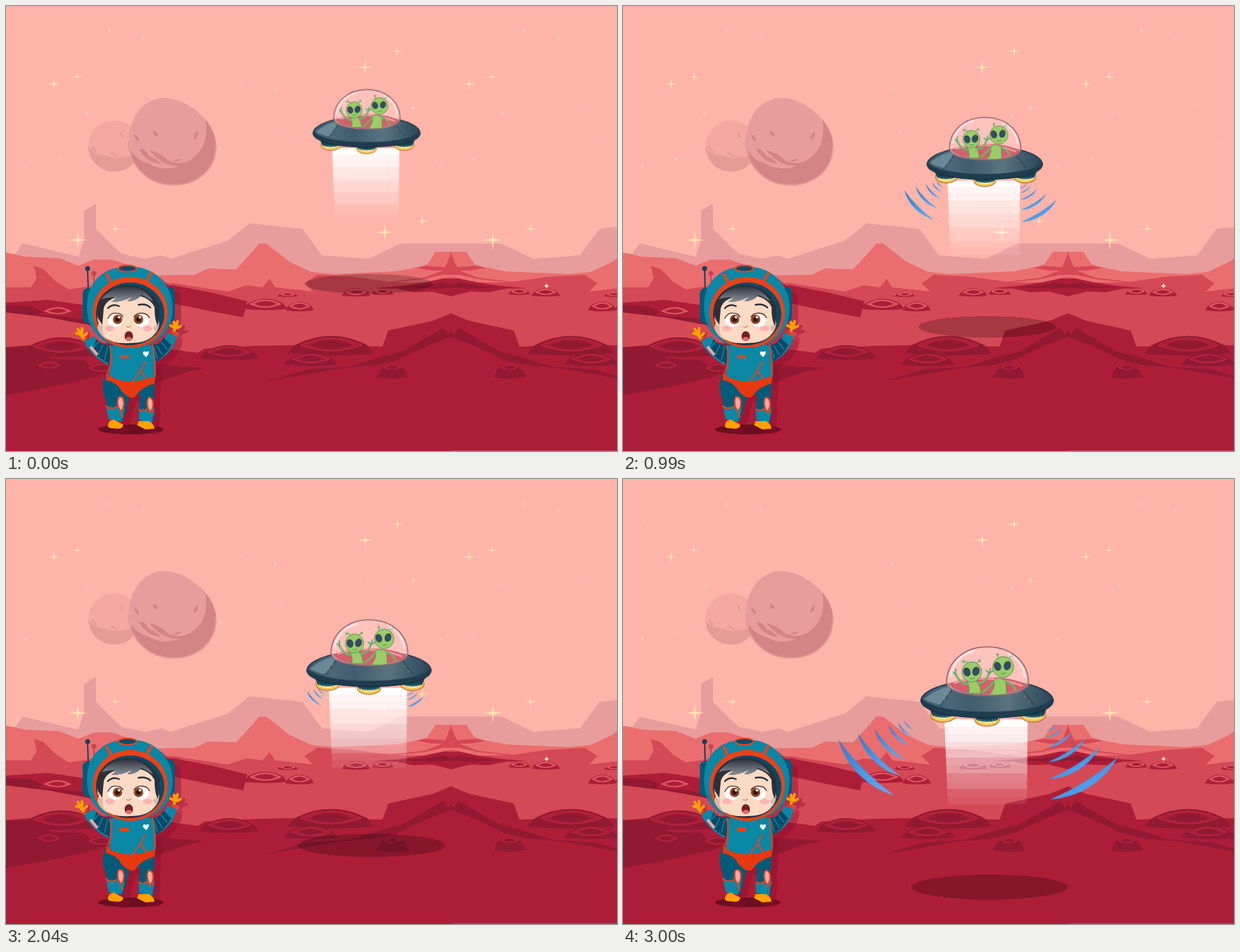
Animation of 876 by 639 pixels, one loop 3030 ms. Source, as an HTML page:

```html
<!DOCTYPE html>
<html lang="en">
<head>
<meta charset="utf-8">
<title>Visitors on the red planet</title>
<style>
  html, body { margin: 0; width: 100%; height: 100%; overflow: hidden; background: #ffb4a9; }
  svg { display: block; width: 876px; height: 639px; }
  #ufo { animation: descend 3030ms steps(101) infinite; }
  #shade { animation: shade 3030ms steps(101) infinite; }
  .wave { animation: spread 1515ms infinite; }
  .wave path { fill: url(#blue); }
  @keyframes descend {
    from { transform: translate(517px, 120px) scale(.81); }
    to { transform: translate(522.05px, 242.2px) scale(1.002); }
  }
  @keyframes shade {
    from { transform: translate(520.4px, 399px) scale(91.5, 14.2); }
    to { transform: translate(525.6px, 587.9px) scale(112.7, 18); }
  }
  @keyframes spread {
    0% { transform: translate(0, 0) scale(.78); animation-timing-function: linear; }
    91.8% { transform: translate(0, 0) scale(1); animation-timing-function: ease-in; }
    98%, 100% { transform: translate(var(--dx), 0) scale(1.17); }
  }
</style>
</head>
<body>
<svg viewBox="0 0 876 639" xmlns="http://www.w3.org/2000/svg">
  <defs>
    <linearGradient id="blue" x1="0" y1="0" x2="1" y2="1">
      <stop offset="0" stop-color="#2f78c4"/><stop offset=".5" stop-color="#4599ea"/><stop offset="1" stop-color="#69aeea"/>
    </linearGradient>
    <linearGradient id="hull" x1="0" y1="0" x2="1" y2="0">
      <stop offset="0" stop-color="#3b5d70"/><stop offset=".2" stop-color="#4a6878"/>
      <stop offset=".38" stop-color="#405e6e"/><stop offset=".66" stop-color="#5a747f"/><stop offset="1" stop-color="#29485a"/>
    </linearGradient>
    <linearGradient id="hair" x1="0" y1="0" x2="0" y2="1">
      <stop offset="0" stop-color="#30343d"/><stop offset="1" stop-color="#8b939b"/>
    </linearGradient>
    <clipPath id="moonClip"><use href="#moonShape"/></clipPath>
    <clipPath id="small"><circle cx="155" cy="201" r="37"/></clipPath>
  </defs>

  <rect width="876" height="639" fill="#ffb4a9"/>
  <g id="far" fill="#e89d9c">
    <path d="M0 357L14 355 24 341 104 360 112 334V294L129 284V320L154 345 166 356 200 363 223 358 236 363 318 337 349 312 425 320 453 358 520 363 566 341H639V400H0Z"/>
  </g>
  <use href="#far" transform="matrix(-1 0 0 1 1276 0)"/>
  <g id="stars" fill="#ffe5b0"></g>

  <g clip-path="url(#small)">
    <circle cx="155" cy="201" r="37" fill="#f4a8a0"/>
    <path d="M116 200Q126 215 144 215 160 222 192 212V240H116Z" fill="#e79b95"/>
    <path d="M123 202l6 8M165 181l2 8M150 211l10 5" stroke="#e79b95" stroke-width="3"/>
  </g>
  <path id="moonShape" d="M228 132C260 133 301 166 301 200 301 236 274 257 240 257 202 257 176 228 176 194 176 160 197 132 228 132Z" fill="#e89d9c"/>
  <g clip-path="url(#moonClip)" fill="#d58485">
    <path d="M286 164Q291 195 274 213 256 232 233 222 221 210 205 207L216 218Q230 230 248 230 222 238 204 226 186 221 180 208L184 262H306V164Z"/>
    <path d="M211 179q8 3 6 8-8-1-6-8M184 184q7 4 7 11-8-4-7-11M269 193q0-10 6-13 1 9-6 13M239 223q6-4 13-3-5 4-13 3M191 205q9-1 14 10 11 4 17 12-22-3-31-22"/>
    <use href="#moonShape" style="opacity:0"/>
  </g>
  <path d="M301 200C301 236 274 257 240 257 202 257 176 228 176 194" fill="none" stroke="#e49995" stroke-width="2"/>

  <g id="land">
    <path fill="#eb6e6f" d="M0 354L28 360 76 362 104 373 126 364 152 364 176 372 202 387 270 386 290 377 330 378 354 352 363 341H373L406 367 438 382 470 385 560 381 590 375 604 371 616 353H639V430H0Z"/>
    <path fill="#d54855" d="M639 352L632 370 626 380 600 390 550 396 500 389 446 386 428 398 440 410 386 404 378 392 368 404 345 401 318 410 240 398 150 398 90 407 72 396 54 378 40 373 44 391 36 404 0 404V640H639Z"/>
    <path fill="#d54855" d="M588 376L603 373 639 376V380L611 380Z"/>
    <path fill="#eb6e6f" d="M556 397L600 392 626 386 639 386V389L600 397Z"/>
    <path fill="#ad1d38" d="M0 426L60 422 130 432 130 404 240 401 292 411 346 424 340 447 292 438 240 427 130 455 60 443 0 437Z"/>
    <path fill="#921932" d="M0 430L36 431 60 443 130 452V460L60 447 0 440Z"/>
    <path fill="#ad1d38" d="M530 405L566 402 600 397 628 391 639 392V417L610 410 584 411 560 406Z"/>
    <path fill="#921932" d="M566 404L600 401 626 397 639 401V404L612 406Z"/>
    <path fill="#ad1d38" d="M0 490L45 486 110 482 200 488 275 498 284 492 360 488 414 487 540 489 548 466 612 452 639 441V640H0Z"/>
    <path fill="#921932" d="M374 539L430 522 492 518 540 503 566 497 600 478 627 462 634 472 639 464V475L604 488 560 509 528 516 476 521Z"/>
    <path fill="#921932" d="M0 490L30 489 66 507 112 508 136 531 80 544 0 559ZM210 514L286 520 260 525 205 545Z"/>
    <g id="craters"></g>
  </g>
  <use href="#land" transform="matrix(-1 0 0 1 1276 0)"/>
  <path d="M638 638.8H876" stroke="#e4a9b2" stroke-width=".4"/>
  <path d="M775 397q0 5 5 5-5 0-5 5 0-5-5-5 5 0 5-5" fill="#ffe5b0"/>

  <circle id="shade" r="1" fill-opacity=".22"/>

  <ellipse cx="179" cy="608" rx="47" ry="7" fill="#6d0d22"/>
  <g id="boy" style="filter:drop-shadow(9px 7px 0 rgba(140,15,45,.42))">
    <path d="M118 410L117 378" stroke="#17405a" stroke-width="2"/>
    <circle cx="117" cy="377" r="3.6" fill="#17405a"/>
    <g id="arms">
      <path d="M151 487Q140 492 126 474L112 481Q118 499 146 516Z" fill="#0a87a4"/>
      <path d="M151 486Q137 489 130 478L124 493Q134 509 148 513Z" fill="#074a68"/>
      <path d="M207 486Q225 489 231 469L244 474Q241 498 212 513Z" fill="#0a87a4"/>
      <path d="M207 486Q220 488 226 476L237 487Q229 503 212 513Z" fill="#074a68"/>
      <path d="M133 482l-8 9M139 486l-7 15M146 488l-5 20M222 482l9 11M216 487l8 14M212 490l5 17" stroke="#0a87a4" stroke-width="1.5"/>
      <path d="M121 489l10 12" stroke="#f3a5a0" stroke-width="4"/>
      <path d="M110 482L116 474M236 468L244 472" stroke="#e8421a" stroke-width="3"/>
      <path d="M111 477L106 471M106 471L101 470M107 470L103 464M109 470L109 463M111 474L116 470M241 466L243 461M242 462L236 459M242 460L241 454M244 460L246 453M245 462L250 460" stroke="#ffa000" stroke-width="4" stroke-linecap="round"/>
    </g>
    <path d="M142 530Q135 547 143 566L147 590 168 596 178 558 192 558 190 595 211 598 212 560 214 530Z" fill="#005b78"/>
    <path d="M143 573Q153 581 167 570L170 580 165 597 147 593ZM190 578Q200 584 211 572L213 580 209 599 191 594Z" fill="#0a87a4"/>
    <path d="M143 574Q151 582 162 573M190 579Q198 584 206 575M164 582L168 591M205 585L212 580" stroke="#e8421a" stroke-width="2" fill="none"/>
    <path d="M161 562q7-3 8 7 0 11-5 12-6-8-3-19M204 562q7 0 7 10-1 9-5 10-6-10-2-20" fill="#f7aaa5" stroke="#e8421a" stroke-width="2"/>
    <path d="M146 604Q147 593 155 594L168 601Q168 607 160 607L149 606ZM190 596L205 596Q213 601 213 607L200 608 188 602Z" fill="#ffa000"/>
    <path d="M148 488Q178 482 210 487 217 509 214 536L182 553 147 532Q152 509 148 488Z" fill="#0a87a4"/>
    <path d="M144 524L151 533Q179 546 214 531L213 542Q194 547 184 562 174 564 165 552 159 540 143 537Z" fill="#e8380f"/>
    <path d="M149 487Q153 504 147 526M210 486Q214 507 214 531M180 542L193 523 200 510M193 523L201 536" fill="none" stroke="#e8421a" stroke-width="2"/>
    <rect x="164" y="501" width="12" height="5" fill="#e8421a"/>
    <path d="M201 504C193 499 197 494 201 497 206 493 206 500 201 504Z" fill="#fff"/>
    <rect x="110" y="405" width="18" height="51" rx="8" fill="#005b78"/>
    <rect x="226" y="403" width="16" height="51" rx="8" fill="#005b78"/>
    <path d="M116 432C116 393 142 374 177 374 213 374 238 399 239 433 239 471 211 490 177 490 143 490 116 470 116 432Z" fill="#0a87a4"/>
    <path d="M144 384L152 400M209 382L200 399" stroke="#e8421a" stroke-width="4"/>
    <ellipse cx="174" cy="377" rx="13" ry="4.5" fill="#074a68" stroke="#e8421a" stroke-width="2"/>
    <ellipse cx="178" cy="440" rx="54" ry="51" fill="#e8421a"/>
    <ellipse cx="178" cy="442" rx="49" ry="45" fill="#074a68"/>
    <ellipse cx="175" cy="444" rx="45" ry="43" fill="#2b3039"/>
    <path d="M133 456Q128 465 139 474 153 486 178 484 203 484 213 471 222 462 218 449L213 431Q202 414 175 415 145 416 138 432Z" fill="#fcdac4"/>
    <path d="M140 440Q131 438 131 451 133 460 139 459Q136 475 149 480 136 477 131 462ZM212 438L218 455 211 462 215 470 220 456Z" fill="#dfb7a2"/>
    <path d="M131 430Q139 403 170 401 204 398 220 431 219 450 218 459 213 453 213 432 206 419 194 415 187 424 174 424 178 420 181 417 165 426 151 425 155 422 159 418 142 423 140 435L138 458 132 448Z" fill="#2b3039"/>
    <path d="M137 421Q151 402 174 403 198 403 211 424 202 418 194 415 187 424 174 424L181 417Q165 426 151 425L159 418Q145 418 137 421Z" fill="url(#hair)"/>
    <path d="M146 434Q153 427 162 431M190 429Q201 427 207 433" stroke="#2b3039" stroke-width="2.4" fill="none" stroke-linecap="round"/>
    <g fill="#fff"><ellipse cx="157" cy="451" rx="11" ry="10"/><ellipse cx="194" cy="451" rx="11" ry="10"/></g>
    <g fill="#8c4422"><circle cx="160" cy="450" r="6.8"/><circle cx="190" cy="450" r="6.8"/></g>
    <g fill="#35150f"><circle cx="160" cy="450" r="3.5"/><circle cx="190" cy="450" r="3.5"/></g>
    <g fill="#fff"><circle cx="162" cy="447" r="1.8"/><circle cx="192" cy="447" r="1.8"/></g>
    <path d="M146 449Q150 440 158 441 165 441 168 447M183 447Q187 441 194 441 203 441 206 448" fill="none" stroke="#59322b" stroke-width="1.3"/>
    <g fill="#ffb4b3"><ellipse cx="149" cy="463" rx="7" ry="4"/><ellipse cx="203" cy="463" rx="7" ry="4"/></g>
    <path d="M172 460q4 3 7-1" stroke="#d99874" stroke-width="1.5" fill="none"/>
    <ellipse cx="176" cy="474" rx="6" ry="7" fill="#791e23"/>
    <ellipse cx="176" cy="478" rx="4" ry="2.7" fill="#e86b6e"/>
  </g>

  <g id="ufo"><g transform="translate(-522 -241)">
    <g id="beam" fill="#fff"></g>
    <g transform="translate(458 341)"><g class="wave" data-angle="135" style="--dx:-36px"></g></g>
    <g transform="translate(578 342)"><g class="wave" data-angle="58" style="--dx:28px"></g></g>
    <g id="lamps"></g>
    <path d="M427 319C427 305 458 293 486 291H560C591 294 617 306 617 319 614 335 572 343 522 343 472 343 430 334 427 319Z" fill="#203d50" stroke="#152c3c" stroke-width="1.3"/>
    <path d="M429 316C434 304 459 294 486 292H560C590 295 612 306 615 316 603 328 566 334 522 334 478 334 442 328 429 316Z" fill="url(#hull)"/>
    <path d="M432 316Q447 302 474 296L456 324Q440 321 432 316Z" fill="#87a2ae" opacity=".6"/>
    <path d="M480 293L454 326M566 294L590 325" stroke="#233f50" fill="none"/>
    <path d="M461 317h.1M467 309h.1M474 301h.1M569 303h.1M576 312h.1M583 320h.1" stroke="#b56b4c" stroke-width="2" stroke-linecap="round"/>
    <path d="M464 294C463 263 489 241 522 241 558 241 583 264 581 296 575 307 548 312 522 311 494 311 468 306 464 294Z" fill="#ffc4c2" fill-opacity=".55"/>
    <path d="M467 294Q491 284 522 285 557 284 580 296 571 309 522 310 476 309 467 294Z" fill="#cf5260"/>
    <path d="M474 293Q522 278 573 297" stroke="#f29095" stroke-width="3" fill="none"/>
    <g stroke="#477e43" stroke-width=".9" fill="#91c95b">
      <path d="M493 291Q503 286 510 293L514 308H495Q498 300 493 291ZM532 288Q541 283 549 290L550 310H525Q534 301 532 288Z"/>
      <ellipse cx="500" cy="277" rx="14" ry="14.5"/>
      <ellipse cx="545" cy="270" rx="15" ry="15"/>
    </g>
    <g fill="none" stroke="#69ad5d" stroke-width="3" stroke-linecap="round">
      <path d="M495 294Q484 296 477 280M509 293Q520 293 525 279M532 291Q521 303 516 306M548 290Q560 294 563 304"/>
      <path d="M477 281L473 277M477 281L477 273M525 279L521 275M525 279L527 272M525 279L531 275" stroke="#48a568" stroke-width="2"/>
      <path d="M495 264L489 262M506 264L510 262M537 258L537 253M552 258L557 254" stroke-width="1.5"/>
    </g>
    <g fill="#69ad5d"><circle cx="488" cy="262" r="2"/><circle cx="511" cy="261" r="2"/><circle cx="537" cy="252" r="2"/><circle cx="558" cy="254" r="2"/></g>
    <g fill="#243c59" stroke="#172b3d">
      <ellipse cx="493" cy="277" rx="4.5" ry="6" transform="rotate(-18 493 277)"/>
      <ellipse cx="506" cy="276" rx="4.5" ry="6" transform="rotate(18 506 276)"/>
      <ellipse cx="537" cy="269" rx="4.5" ry="6" transform="rotate(-18 537 269)"/>
      <ellipse cx="551" cy="268" rx="4.5" ry="6" transform="rotate(18 551 268)"/>
    </g>
    <path d="M497 286q4 2 7-1M542 279q4 2 7-1" stroke="#477e43" fill="none"/>
    <path d="M464 294C463 263 489 241 522 241 558 241 583 264 581 296 575 307 548 312 522 311 494 311 468 306 464 294Z" fill="#fff" fill-opacity=".08" stroke="#8b6470" stroke-width="1.6"/>
    <path d="M470 283Q474 255 503 247M553 251Q573 262 576 284" stroke="#fff" stroke-opacity=".55" stroke-width="3" fill="none" stroke-linecap="round"/>
  </g></g>
</svg>
<script>
  const put = (id, html) => document.getElementById(id).innerHTML = html;

  // Sparkles repeat sideways with the sky tile.
  const stars = [
    [515, 88, 12], [561, 65, 9], [69, 112, 9], [102, 102, 7], [103, 336, 14], [157, 320, 9],
    [543, 325, 13], [597, 309, 9], [584, 146, 6], [308, 207, 4], [28, 230, 4], [76, 220, 4],
    [148, 36, 4], [197, 45, 4], [117, 154, 4], [338, 110, 3], [386, 121, 4], [396, 181, 3],
    [420, 249, 3], [508, 147, 3], [557, 158, 4], [517, 261, 4], [225, 143, 3], [259, 197, 3],
    [190, 253, 2], [12, 22, 2], [36, 69, 2], [201, 97, 2], [212, 65, 2]
  ];
  const star = (x, y, r) =>
    `<path transform="translate(${x} ${y}) scale(${r})" d="M0-1L.09-.22Q.12-.12.22-.09L1 0 .22.09Q.12.12.09.22L0 1-.09.22Q-.12.12-.22.09L-1 0-.22-.09Q-.12-.12-.09-.22Z"/>`;
  put('stars', stars.map(([x, y, r]) => star(x, y, r) + star(x + 595, y, r)).join(''));

  const crater = ([x, y, w, h, near]) => {
    const [base, rim] = near ? ['#921932', '#c52d45'] : ['#ad1d38', '#ed7775'];
    const lens = k => `M${x - w * k} ${y}Q${x} ${y - h * 2 * k} ${x + w * k} ${y}Q${x} ${y + h * 1.6 * k} ${x - w * k} ${y}Z`;
    return `<path fill="${base}" d="M${x - w * 1.2} ${y + h}L${x - w} ${y}Q${x} ${y - h * 2.2} ${x + w} ${y}L${x + w * 1.2} ${y + h}Q${x} ${y + h * 1.5} ${x - w * 1.2} ${y + h}Z"/>
      <path fill="${near ? '#ad1d38' : '#d54855'}" stroke="${rim}" stroke-width=".9" d="${lens(.85)}"/>
      <path fill="${base}" d="${lens(.6)}"/>`;
  };
  put('craters', [
    [74, 438, 22, 6], [372, 428, 26, 7], [421, 431, 17, 6], [404, 414, 12, 3], [502, 411, 17, 5], [540, 410, 13, 4],
    [80, 489, 48, 12, 1], [62, 516, 18, 6, 1], [136, 520, 20, 7, 1], [320, 497, 36, 9, 1],
    [466, 487, 52, 12, 1], [437, 507, 32, 8, 1], [554, 519, 14, 5, 1]
  ].map(crater).join('') + '<path fill="#921932" d="M536 523L572 522 576 533 558 536 530 533Z"/>');

  const bands = 11;
  put('beam', Array.from({ length: bands }, (_, i) => {
    const y = 345 + i * 122 / bands, x = 461 + i * .45;
    const fade = Math.max(.06, 1 - i / bands - (i % 2 ? .05 : 0));
    return `<rect x="${x}" y="${y}" width="${580 - i * .1 - x}" height="${122 / bands}" opacity="${fade}"/>`;
  }).join(''));

  put('lamps', [[459, 339], [522, 345], [588, 339]].map(([x, y]) =>
    `<ellipse cx="${x}" cy="${y}" rx="18" ry="10" fill="#f4c85a" stroke="#a8552d"/>
     <ellipse cx="${x}" cy="${y - 1}" rx="14" ry="7" fill="#fff0a2"/>
     <path d="M${x - 19} ${y - 8}H${x + 19}L${x + 15} ${y + 1}Q${x} ${y + 6} ${x - 15} ${y + 1}Z" fill="#174253"/>
     <path d="M${x - 13} ${y}Q${x} ${y + 4} ${x + 13} ${y}" fill="none" stroke="#328294" stroke-width="2" stroke-dasharray="2 2"/>`
  ).join(''));

  // Each crescent pops in at its own moment, then all leave together.
  const radii = [17, 25, 37, 55, 76, 101], starts = [60, 120, 240, 600, 690, 1110];
  const crescent = (r, mid) => {
    const at = d => {
      const a = (mid + d) * Math.PI / 180;
      return `${r * Math.cos(a)} ${r * Math.sin(a)}`;
    };
    return `M${at(29)}A${r} ${r} 0 0 0 ${at(-29)}A${r * 3} ${r * 3} 0 0 1 ${at(29)}Z`;
  };
  for (const wave of document.querySelectorAll('.wave'))
    wave.innerHTML = radii.map((r, i) =>
      `<path d="${crescent(r, +wave.dataset.angle)}" style="animation:pop${i} 1515ms step-end infinite"/>`).join('');

  const style = document.createElement('style');
  style.textContent = starts.map((t, i) =>
    `@keyframes pop${i}{0%{opacity:0}${t / 15.15}%{opacity:1}98.6%,100%{opacity:0}}`).join('');
  document.head.append(style);
</script>
</body>
</html>
```
